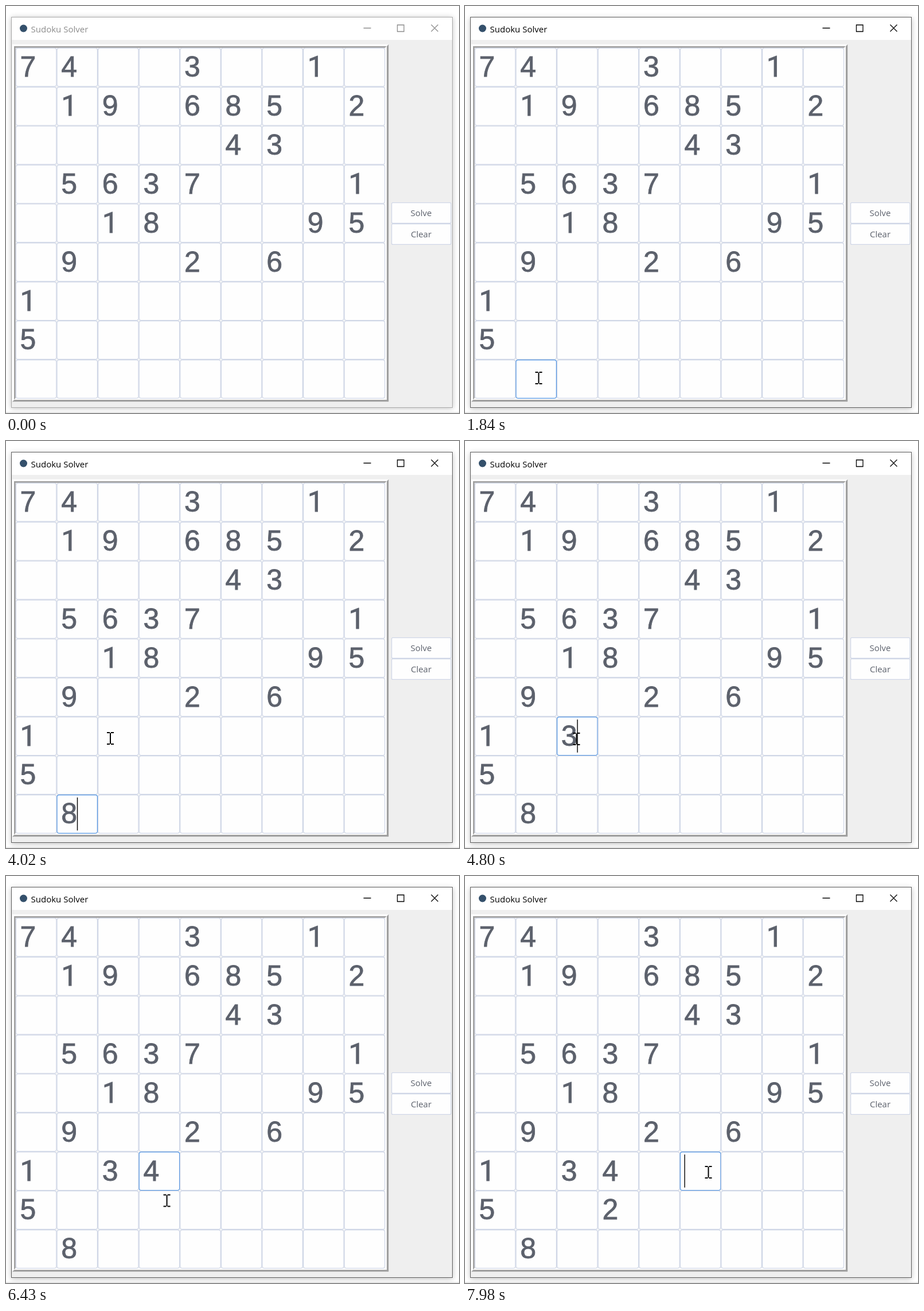
Recreate the animation shown at these times as an HTML page with a canvas. Size 790 px wide and 709 px high, loop 8 s.

```html
<!DOCTYPE html>
<html lang="en">
<head>
<meta charset="utf-8">
<title>Sudoku Solver</title>
<style>
html, body { margin: 0; width: 100%; height: 100%; overflow: hidden; background: #fff; }
canvas { display: block; width: 790px; height: 709px; }
</style>
</head>
<body>
<canvas id="stage" width="790" height="709"></canvas>
<script>
const ctx = document.getElementById('stage').getContext('2d');
const LOOP = 8000;
const CARET_ON = 600, CARET_OFF = 300;
const INK = '#5c616c', LINE = '#cfd6e6', FOCUS = '#5294e2', RIDGE = '#a0a0a0';
const UI_FONT = '15px "Open Sans", "Noto Sans", sans-serif';
const DIGIT_FONT = '50px "Liberation Sans", Arial, sans-serif';
const ONE_FONT = '50px Roboto, sans-serif'; // a "1" without a foot
const DIGIT_WIDTH = 27.8;
const CELL_W = 71.6, CELL_H = 67.9;

const puzzle = [
  '74..3..1.',
  '.19.685.2',
  '.....43..',
  '.5637...1',
  '..18...95',
  '.9..2.6..',
  '1........',
  '5........',
  '.........'
];

// Cells in the order they are clicked and filled
const entries = [
  { at: 1220, row: 8, col: 1, digit: '8', typed: 2390 },
  { at: 4240, row: 6, col: 2, digit: '3', typed: 4580 },
  { at: 5560, row: 6, col: 3, digit: '4', typed: 6110 },
  { at: 6580, row: 7, col: 3, digit: '2', typed: 6960 },
  { at: 7740, row: 6, col: 5, digit: '', typed: LOOP }
];

// Pointer strokes, each starting where the last one ended and bending towards "via"
const pointerStart = [754, 694];
const strokes = [
  { from: 150, until: 1000, via: [450, 180], to: [128.5, 648] },
  { from: 3410, until: 4010, via: [150, 560], to: [182, 518] },
  { from: 4580, until: 5410, via: [215, 521], to: [278, 520] },
  { from: 6110, until: 6560, via: [278, 550], to: [282, 576] },
  { from: 6700, until: 7060, via: [370, 572], to: [448, 521] },
  { from: 7200, until: 7500, via: [436, 517], to: [424.5, 516] }
];

const cellX = col => 16.8 + CELL_W * col;
const cellY = row => 72.8 + CELL_H * row;
const smooth = u => u * u * (3 - 2 * u);

function rect(x, y, w, h, color) {
  ctx.fillStyle = color;
  ctx.fillRect(x, y, w, h);
}

function poly(points, fill, stroke) {
  ctx.beginPath();
  points.forEach(([x, y]) => ctx.lineTo(x, y));
  ctx.closePath();
  ctx.fillStyle = fill;
  ctx.fill();
  if (stroke) {
    ctx.strokeStyle = stroke;
    ctx.stroke();
  }
}

function box(x, y, w, h, r, stroke) {
  ctx.beginPath();
  ctx.roundRect(x + 0.6, y + 0.6, w - 1.2, h - 1.2, r);
  ctx.fillStyle = '#fefefe';
  ctx.fill();
  ctx.lineWidth = 1.2;
  ctx.strokeStyle = stroke;
  ctx.stroke();
}

function label(text, x, y, color, font, align = 'left') {
  ctx.font = font;
  ctx.fillStyle = color;
  ctx.textAlign = align;
  ctx.fillText(text, x, y);
}

function bevel(x0, y0, x1, y1, w, topLeft, bottomRight) {
  poly([[x0, y0], [x1, y0], [x1 - w, y0 + w], [x0 + w, y0 + w], [x0 + w, y1 - w], [x0, y1]], topLeft);
  poly([[x1, y1], [x0, y1], [x0 + w, y1 - w], [x1 - w, y1 - w], [x1 - w, y0 + w], [x1, y0]], bottomRight);
}

function drawWindow(active) {
  rect(0, 0, 790, 709, '#fff');
  rect(0, 707.5, 790, 1, '#d9d9d9');
  ctx.save();
  ctx.shadowColor = 'rgba(0,0,0,0.24)';
  ctx.shadowBlur = 9;
  ctx.shadowOffsetY = active ? 2 : 1;
  rect(9, 19, 770, 681, active ? '#5f5f5f' : '#aaa');
  ctx.restore();
  rect(10, 20, 768, 39, '#fff');
  rect(10, 59, 768, 640, '#efefef');

  ctx.beginPath();
  ctx.arc(30.5, 39, 6.5, 0, Math.PI * 2);
  ctx.fillStyle = '#34506b';
  ctx.fill();

  const ink = active ? '#000' : '#8c8c8c';
  label('Sudoku Solver', 43.5, 45.5, ink, UI_FONT);
  ctx.strokeStyle = ink;
  ctx.lineWidth = 1.3;
  ctx.beginPath();
  ctx.moveTo(623.5, 38.5);
  ctx.lineTo(636.5, 38.5);
  ctx.rect(682.5, 33, 11.5, 11.5);
  ctx.moveTo(741.5, 32.5);
  ctx.lineTo(753.5, 44.5);
  ctx.moveTo(753.5, 32.5);
  ctx.lineTo(741.5, 44.5);
  ctx.stroke();
}

function drawButton(text, y) {
  box(672, y, 104.5, 37, 2, LINE);
  label(text, 724, y + 24, INK, UI_FONT, 'center');
}

function drawDigit(digit, row, col) {
  const x = cellX(col) + 7.8, y = cellY(row) + 50.3;
  label(digit, x, y, INK, digit === '1' ? ONE_FONT : DIGIT_FONT);
  ctx.lineWidth = 0.8;
  ctx.strokeStyle = INK;
  ctx.strokeText(digit, x, y);
}

function drawCaret(t, entry) {
  if ((t - entry.at) % (CARET_ON + CARET_OFF) >= CARET_ON) return;
  const shift = t >= entry.typed ? DIGIT_WIDTH : 0;
  rect(cellX(entry.col) + 7.6 + shift, cellY(entry.row) + 5, 1.4, 57.5, '#000');
}

function drawBoard(t) {
  bevel(11, 66.8, 667.3, 689.3, 3.4, '#fff', RIDGE);
  bevel(14, 70.1, 663.9, 685.9, 2.8, RIDGE, '#fff');
  rect(16.8, 72.8, CELL_W * 9, CELL_H * 9, '#f5f6f7');

  const focused = entries.filter(e => e.at <= t).pop();
  for (let row = 0; row < 9; row++) {
    for (let col = 0; col < 9; col++) {
      const on = focused && focused.row === row && focused.col === col;
      box(cellX(col), cellY(row), CELL_W, CELL_H, 3.5, on ? FOCUS : LINE);
      if (puzzle[row][col] !== '.') drawDigit(puzzle[row][col], row, col);
    }
  }
  for (const e of entries) {
    if (t >= e.typed) drawDigit(e.digit, e.row, e.col);
  }
  if (focused) drawCaret(t, focused);
}

function pointerAt(t) {
  const i = strokes.filter(s => s.from <= t).length - 1;
  if (i < 0) return null;
  const { from, until, via, to } = strokes[i];
  const start = i ? strokes[i - 1].to : pointerStart;
  const u = smooth(Math.min(1, (t - from) / (until - from))), v = 1 - u;
  return start.map((s, k) => v * v * s + 2 * u * v * via[k] + u * u * to[k]);
}

function drawPointer(x, y) {
  if (x > 662) {
    ctx.lineWidth = 1;
    const arrow = [[0, 0], [0, 17], [4, 13.3], [6.8, 19.5], [9.3, 18.4], [6.6, 12.3], [12, 12]];
    poly(arrow.map(([dx, dy]) => [x + dx, y + dy]), '#fff', '#000');
    return;
  }
  rect(x - 1, y - 9.5, 2, 19, '#000');
  for (const dy of [-11, 9]) {
    rect(x - 6, y + dy, 5, 2, '#000');
    rect(x + 1, y + dy, 5, 2, '#000');
  }
}

function draw(t) {
  drawWindow(t >= entries[0].at);
  drawBoard(t);
  drawButton('Solve', 342);
  drawButton('Clear', 379);
  const pointer = pointerAt(t);
  if (pointer) drawPointer(...pointer);
}

const begin = performance.now();
function tick() {
  draw((performance.now() - begin) % LOOP);
  requestAnimationFrame(tick);
}
tick();
</script>
</body>
</html>
```
